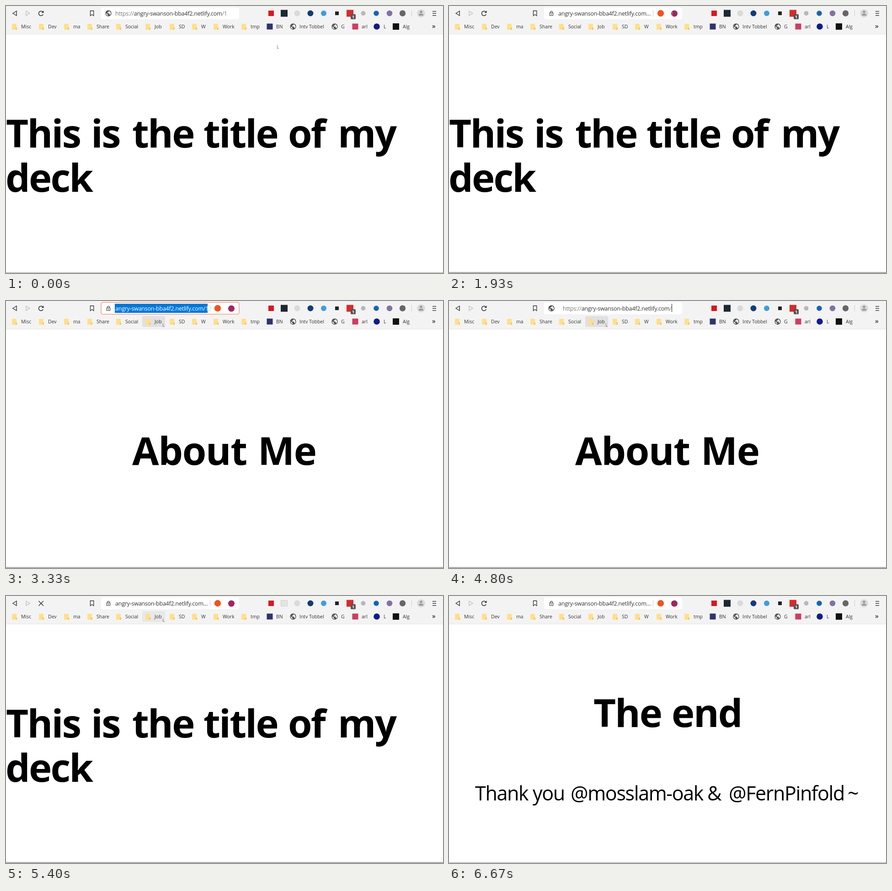
An HTML page with a canvas for the animation above (6790 ms loop, 956 by 585 pixels).

```html
<!DOCTYPE html>
<html lang="en">
<head>
<meta charset="utf-8">
<title>Slide deck in a browser</title>
<style>
html, body { margin: 0; width: 100%; height: 100%; overflow: hidden; background: #fff; }
canvas { display: block; }
</style>
</head>
<body>
<canvas id="stage" width="956" height="585"></canvas>
<script>
const ctx = document.getElementById('stage').getContext('2d');
const LOOP = 6790;
const FACE = '"Open Sans", "Noto Sans", sans-serif';
const SCHEME = 'https://', HOST = 'angry-swanson-bba4f2.netlify.com';
const INK = '#333', GREY = '#777', BLUE = '#0078d7';

const FOLDERS = [['Misc', 13], ['Dev', 72], ['ma', 127], ['Share', 178], ['Social', 241],
  ['Job', 305], ['SD', 358], ['W', 407], ['Work', 454], ['tmp', 515]];
const LINKS = [['BN', 591], ['Intv Tobbel', 642], ['G', 733], ['arl', 778], ['L', 826], ['Alg', 868]];

// time, x, y
const POINTER = [[870, 490, 27], [930, 489, 18], [2530, 457, 18], [2600, 415, 18],
  [2730, 385, 18], [2870, 367, 27], [3000, 351, 37], [3130, 344, 53]];

const TITLE = [['This', 1, 310], ['is', 192, 310], ['the', 277, 310], ['title', 433, 310],
  ['of', 620, 310], ['my', 732, 310], ['deck', 2, 407]];
const ABOUT = [['About', 276, 359], ['Me', 558, 359]];
const END = [['The', 317, 287], ['end', 490, 287]];
const THANKS = [['Thank', 57, 448], ['you', 183, 448], ['@mosslam-oak', 268, 448],
  ['&', 567, 448], ['@FernPinfold', 614, 448], ['~', 874, 448]];

function rect(x, y, w, h, color, r = 0) {
  ctx.fillStyle = color;
  ctx.beginPath();
  ctx.roundRect(x, y, w, h, r);
  ctx.fill();
}

function square(cx, cy, size, color) {
  rect(cx - size / 2, cy - size / 2, size, size, color);
}

function disc(cx, cy, r, color) {
  ctx.fillStyle = color;
  ctx.beginPath();
  ctx.arc(cx, cy, r, 0, Math.PI * 2);
  ctx.fill();
}

function path(points, color, width, closed) {
  ctx.strokeStyle = color;
  ctx.lineWidth = width;
  ctx.beginPath();
  points.forEach(([x, y]) => ctx.lineTo(x, y));
  if (closed) ctx.closePath();
  ctx.stroke();
}

function setFont(size, weight = 400, spacing = 0) {
  ctx.font = `${weight} ${size}px ${FACE}`;
  ctx.letterSpacing = spacing + 'px';
}

function text(str, x, y, color) {
  ctx.fillStyle = color;
  ctx.fillText(str, x, y);
}

// Places each word by its left ink edge.
function words(list) {
  for (const [str, x, y] of list) {
    text(str, x + ctx.measureText(str).actualBoundingBoxLeft, y, '#000');
  }
}

function heading(list, spacing) {
  setFont(85, 700, spacing);
  words(list);
}

function globe(cx, cy) {
  disc(cx, cy, 6.7, '#555');
  ctx.fillStyle = '#fff';
  ctx.beginPath();
  ctx.moveTo(cx + 1, cy - 5.3);
  ctx.quadraticCurveTo(cx + 1, cy - 2, cx - 2, cy - 2);
  ctx.lineTo(cx - 2, cy);
  ctx.lineTo(cx + 2, cy);
  ctx.lineTo(cx + 2.5, cy + 2.5);
  ctx.lineTo(cx + 4.3, cy + 3.4);
  ctx.quadraticCurveTo(cx + 7, cy - 2, cx + 1, cy - 5.3);
  ctx.moveTo(cx - 5.4, cy - .6);
  ctx.lineTo(cx - 1.5, cy + 2.8);
  ctx.lineTo(cx - 1, cy + 5.3);
  ctx.quadraticCurveTo(cx - 5.2, cy + 4, cx - 5.4, cy - .6);
  ctx.fill();
}

function lock(x, y) {
  ctx.strokeStyle = '#555';
  ctx.lineWidth = 1.3;
  ctx.strokeRect(x - 3.6, y - 1, 7.2, 5.8);
  ctx.beginPath();
  ctx.arc(x, y - 2.4, 2.3, Math.PI, 0);
  ctx.lineTo(x + 2.3, y - 1);
  ctx.moveTo(x - 2.3, y - 2.4);
  ctx.lineTo(x - 2.3, y - 1);
  ctx.stroke();
  disc(x, y + 1.9, 1, '#555');
}

function navButtons(loading) {
  path([[15, 16], [23, 11], [23, 21]], INK, 1.4, true);
  path([[52, 16], [44, 11], [44, 21]], '#b9b9b9', 1.2, true);
  if (loading) {
    path([[71.5, 11], [82, 21.5]], INK, 1.5);
    path([[82, 11], [71.5, 21.5]], INK, 1.5);
  } else {
    ctx.strokeStyle = INK;
    ctx.lineWidth = 1.6;
    ctx.beginPath();
    ctx.arc(76.5, 16.3, 5, .35, 5.5);
    ctx.stroke();
    ctx.fillStyle = INK;
    ctx.beginPath();
    ctx.moveTo(82.5, 10);
    ctx.lineTo(82.5, 15);
    ctx.lineTo(77.5, 15);
    ctx.fill();
  }
  path([[184.5, 10.5], [191.8, 10.5], [191.8, 21.5], [188.1, 18.6], [184.5, 21.5]], INK, 1.3, true);
}

function extensions(loading) {
  square(580, 16, 12, '#d6191f');
  if (loading) {
    rect(601, 9, 15, 14, '#e4e4e4');
    ctx.strokeStyle = '#d0d0d0';
    ctx.lineWidth = 1;
    ctx.strokeRect(601.5, 9.5, 14, 13);
  } else {
    square(608.5, 16, 15, '#1c2832');
  }
  disc(637, 16, 6.5, '#dadada');
  disc(666, 16, 6.5, '#123b78');
  disc(695, 16, 6, '#409ddd');
  square(724, 16, 8, '#222');
  square(752.5, 16, 15, '#d52b2b');
  rect(754, 18, 11, 11, '#555', 2);
  setFont(9, 700);
  text('1', 757, 27, '#fff');
  disc(781.5, 16, 5, '#b8b8b8');
  disc(810, 16, 5.8, '#1764b4');
  disc(839, 16, 6.3, '#8272a4');
  disc(867.5, 16, 6.7, '#666');
  rect(887, 9, 1, 14, '#ccc');
  disc(908, 16, 8.8, '#d9d9d9');
  disc(908, 13, 2.7, '#999');
  rect(903, 17, 10, 4, '#999', [3, 3, 1, 1]);
  for (const y of [11, 15.5, 20]) rect(933, y, 8, 1.4, INK);
}

function bookmarks(hover) {
  if (hover) rect(298, 33, 50, 24, hover, 3);
  setFont(10.5);
  for (const [label, x] of FOLDERS) {
    rect(x, 39, 10, 13, '#ffe08a', 1);
    rect(x + 8, 47, 3, 5, '#f3ca5d', .5);
    text(label, x + 20, 49, INK);
  }
  for (const [label, x] of LINKS) text(label, x, 49, INK);
  square(577, 45, 13, '#30336f');
  globe(628, 45);
  globe(719, 45);
  square(764, 45, 13, '#cf3c62');
  disc(811, 45, 6.8, '#101b8c');
  square(853, 45, 14, '#111');
  setFont(14, 600);
  text('»', 932, 49, INK);
}

function addressState(t) {
  if (t < 1200) return { scheme: true, path: '/1' };
  if (t < 1870) return { scheme: true, path: '/1', focus: true, selected: true };
  if (t < 2870) return { path: '…' };
  if (t < 4070) return { path: '/1', focus: true, selected: true };
  if (t < 4800) return { path: '/1', focus: true, caret: t < 4600 };
  if (t < 4930) return { scheme: true, path: '/', x: 249, caret: true };
  if (t < 5270) return { scheme: true, path: '/1' };
  return { path: '…' };
}

function addressBar(t) {
  const s = addressState(t);
  const x = s.x || 239;
  rect(208, 3, 302, 26, '#fff', 4);
  if (s.focus) {
    ctx.strokeStyle = '#f8b5a3';
    ctx.lineWidth = 2;
    ctx.beginPath();
    ctx.roundRect(208, 3, 302, 26, 4);
    ctx.stroke();
  }
  if (s.scheme) globe(224, 16);
  else {
    lock(224, 16);
    rect(446, 9, 1, 14, '#ccc');
    disc(463, 16, 7.2, '#f4511e');
    disc(493, 16.5, 7, '#a3265f');
  }

  setFont(12.5, 400, -.24);
  const parts = [[s.scheme ? SCHEME : '', GREY], [HOST, INK], [s.path, s.path === '…' ? INK : GREY]];
  const width = parts.reduce((sum, [str]) => sum + ctx.measureText(str).width, 0);
  const edge = s.scheme ? 500 : 441;
  ctx.save();
  ctx.beginPath();
  ctx.rect(238, 4, edge - 238, 24);
  ctx.clip();
  if (s.selected) rect(x - 1, 6, Math.round(width) + 1, 20, BLUE);
  let pen = x;
  for (const [str, color] of parts) {
    text(str, pen, 20.5, s.selected ? '#fff' : color);
    pen += ctx.measureText(str).width;
  }
  if (s.caret) rect(Math.min(Math.round(pen), edge - 1), 6, 1, 18, '#222');
  ctx.restore();
}

function slide(t) {
  if (t < 3130 || (t >= 5400 && t < 5930)) heading(TITLE, -2.8);
  else if (t < 5400) heading(ABOUT, -1.4);
  else {
    heading(END, -2.2);
    setFont(43, 400, -1.4);
    words(THANKS);
  }
}

function pointerAt(t) {
  if (t < 870) {
    const step = t < 70 ? 0 : Math.min(8, Math.floor((t - 70) / 94.2) + 1);
    const p = step / 8, ease = p * p * (3 - 2 * p);
    return [594 - 104 * ease, 90 - 56 * ease];
  }
  return POINTER.filter(k => k[0] <= t).pop().slice(1);
}

function pointer(t) {
  if (t >= 6000) return;
  const [px, py] = pointerAt(t);
  const x = Math.round(px), y = Math.round(py);
  rect(x - 1, y - 4, 1, 8, '#888');
  if (y < 29) {
    rect(x - 2, y - 4, 3, 1, '#aaa');
    rect(x - 2, y + 3, 3, 1, '#aaa');
  } else {
    rect(x + 1, y + 1, 1, 3, '#999');
    rect(x + 2, y + 3, 1, 1, '#aaa');
  }
}

function hoverColor(t) {
  if (t < 3130 || t >= 6000) return null;
  return t < 5400 ? '#e1e1e1' : '#e8e8e8';
}

function draw(t) {
  const loading = (t >= 1870 && t < 1930) || (t >= 5270 && t < 5800);
  rect(0, 0, 956, 585, '#fff');
  rect(0, 0, 956, 62, '#f3f3f3');
  rect(0, 61, 956, 1, '#e6e6e6');
  navButtons(loading);
  addressBar(t);
  extensions(loading);
  bookmarks(hoverColor(t));
  slide(t);
  rect(0, 583, 956, 1, t < 70 || t >= 6670 ? '#c3c3c3' : '#858585');
  rect(0, 584, 956, 1, '#d0d0d0');
  pointer(t);
}

const start = performance.now();
function tick() {
  draw((performance.now() - start) % LOOP);
  requestAnimationFrame(tick);
}
tick();
</script>
</body>
</html>
```
